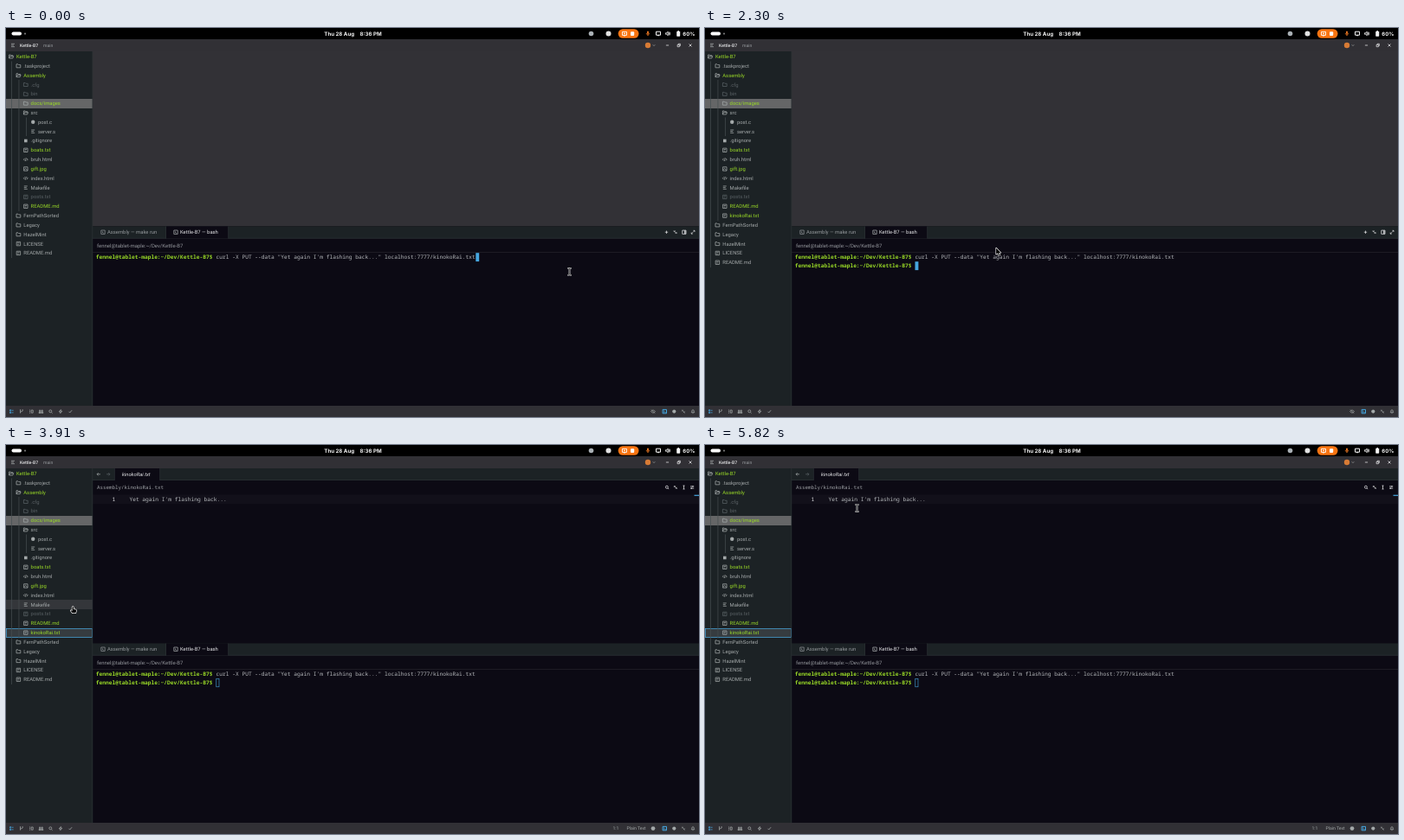
Write an HTML page with a canvas that moves like this. It is 800 by 450 pixels and loops after 5850 ms.

```html
<!DOCTYPE html>
<html lang="en">
<head>
<meta charset="utf-8">
<title>Editor and terminal</title>
<style>
html, body { margin: 0; width: 100%; height: 100%; overflow: hidden; background: #0c0a14; }
canvas { display: block; width: 800px; height: 450px; }
</style>
</head>
<body>
<canvas id="stage" width="800" height="450"></canvas>
<script>
const ctx = document.getElementById('stage').getContext('2d');
const LOOP = 5850;
const BELL = 300, ENTER = 1500, PRESS = 3235, OPEN = 3265;

const SANS = 'Roboto, "Noto Sans", sans-serif';
const MONO = '"Noto Sans Mono", "DejaVu Sans Mono", monospace';
const C = {
  bar: '#313035', side: '#1c2225', dark: '#0c0a14', edge: '#2c3236', guide: '#474e51',
  text: '#a3a8a9', dim: '#596064', green: '#98d827', blue: '#45a6df', white: '#e4e5e7'
};

const FILE = 'kinokoRai.txt', ROOT = 'Kettle-B7';
const PATH = 'fennel@tablet-maple:~/Dev/' + ROOT;
const MESSAGE = "Yet again I'm flashing back...";
const COMMAND = `curl -X PUT --data "${MESSAGE}" localhost:7777/${FILE}`;
const CHAR = 3.748;

// [indent, label, icon, colour]
const TREE = [
  [0, ROOT, 'open', C.green],
  [1, '.taskproject', 'folder', C.text],
  [1, 'Assembly', 'open', C.green],
  [2, '.cfg', 'folder', C.dim],
  [2, 'bin', 'folder', C.dim],
  [2, 'docs/images', 'folder', C.green],
  [2, 'src', 'open', C.text],
  [3, 'post.c', 'disc', C.text],
  [3, 'server.s', 'lines', C.text],
  [2, '.gitignore', 'square', C.text],
  [2, 'boats.txt', 'page', C.green],
  [2, 'bruh.html', 'code', C.text],
  [2, 'gift.jpg', 'image', C.green],
  [2, 'index.html', 'code', C.text],
  [2, 'Makefile', 'lines', C.text],
  [2, 'posts.txt', 'page', C.dim],
  [2, 'README.md', 'page', C.green],
  [2, FILE, 'page', C.green],
  [1, 'FernPathSorted', 'folder', C.text],
  [1, 'Legacy', 'folder', C.text],
  [1, 'HazelMint', 'folder', C.text],
  [1, 'LICENSE', 'page', C.text],
  [1, 'README.md', 'page', C.text]
];
const NEW_ROW = 17, MARKED_ROW = 5, ROW = 10.83;

// Line icons, each centred on the origin
const ICONS = {
  folder: 'M-2.4 2V-2H-.6L.1-1.2H2.4V2Z',
  open: 'M-2.4 2V-2H-.6L.1-1.2H2V-.3M-2.4 2L-1.4-.3H2.7L1.8 2Z',
  page: 'M-2.2-2.2H2.2V2.2H-2.2ZM-1.1-.8H1M-1.1.8H.4',
  image: 'M-2.2-2.2H2.2V2.2H-2.2ZM-2.1 1.6L0-.4L2.1 1.8M-.9-1.1H-.4',
  code: 'M-1.1-1.4L-2.4 0L-1.1 1.4M1.1-1.4L2.4 0L1.1 1.4M.4-1.8L-.4 1.8',
  lines: 'M-2-1.7H2M-2 0H1M-2 1.7H2',
  prompt: 'M-2.2-2.2H2.2V2.2H-2.2ZM-1.1-.8L-.1 0L-1.1.9M.3 1H1.2',
  plus: 'M-1.7 0H1.7M0-1.7V1.7',
  close: 'M-1.5-1.5L1.5 1.5M-1.5 1.5L1.5-1.5',
  minus: 'M-1.6 0H1.6',
  restore: 'M-1.6-.6H.7V1.7H-1.6ZM-.6-.7V-1.7H1.7V.6H.8',
  chevron: 'M-1.2-.6L0 .6L1.2-.6',
  pen: 'M-1.8-1.8L1.8 1.8M-1.8-.3L-.3-1.8M.1 1.5L1.6 0',
  split: 'M-2.1-2.1H2.1V2.1H-2.1ZM.6-2.1V2.1M1.3-1.8V1.8',
  expand: 'M.4-1.9H1.9V-.4M1.9-1.9L.3-.3M-.4 1.9H-1.9V.4M-1.9 1.9L-.3.3',
  back: 'M1.9 0H-1.9M-.4-1.6L-1.9 0L-.4 1.6',
  next: 'M-1.9 0H1.9M.4-1.6L1.9 0L.4 1.6',
  search: 'M1.1-.3A1.5 1.5 0 1 1-1.9-.3A1.5 1.5 0 1 1 1.1-.3M.7.9L1.9 2.1',
  beam: 'M-1-2H1M0-2V2M-1 2H1',
  sliders: 'M-2.1-1.1H2.1M-2.1 1.1H2.1M.8-2V-.2M-.8.2V2',
  panel: 'M-2-1.9H-.6V-.6H-2ZM-2 .6H-.6V1.9H-2ZM.4-1.3H2.1M.4 1.3H2.1',
  branch: 'M-1.3-2V2M1.3-2V-.9C1.3.5-1.3-.2-1.3 1M-1.8-1.7H-.8M.8-1.7H1.8',
  outline: 'M-2.1-1.6H-1M-2.1 0H-1M-2.1 1.6H-1M.1-1.6H2.1V1.6H.1Z',
  people: 'M-1.9-1.5H-.5V0H-1.9ZM.6-1.5H1.9V0H.6ZM-2.4 1.9V.9H0V1.9ZM.3.9H2.4V1.9H.6',
  bolt: 'M.3-2.1L-1.8.4H0L-.3 2.1L1.8-.4H0Z',
  check: 'M-1.8.2L-.6 1.4L1.8-1.4',
  hidden: 'M-2.4 0C-1-2 1-2 2.4 0C1 2-1 2-2.4 0M-2-2L2 2',
  bell: 'M-1.8 1.1H1.8L1.2.3V-.6C1.2-2.4-1.2-2.4-1.2-.6V.3ZM-.5 2H.5',
  mic: 'M-.5-2.4H.5V.2H-.5ZM-1.7-.3C-1.7 2 1.7 2 1.7-.3M0 1.5V2.6',
  screen: 'M-2.5-2H2.5V2H-2.5ZM-1 2.5H1',
  sound: 'M-2.4-.8H-1.3L.2-2.2V2.2L-1.3.8H-2.4ZM1.1-1.2Q2 0 1.1 1.2M1.9-2Q3.2 0 1.9 2'
};
for (const key in ICONS) ICONS[key] = new Path2D(ICONS[key]);

const ARROW = new Path2D('M0 0V7.3L1.7 5.8L2.9 8.4L4 7.9L2.9 5.4H5.2Z');
const HAND = new Path2D('M-.7.6Q0-.4.7.6V3L3.4 3.6Q4 3.9 3.8 4.8L3.2 7.3H-.6L-2.6 4.7Q-2.4 3.7-.7 5Z');
const BEAM = new Path2D('M-2.2-4Q0-4 0-3Q0-4 2.2-4M0-3.4V3.4M-2.2 4Q0 4 0 3Q0 4 2.2 4');

const linear = u => u, easeIn = u => u * u, easeOut = u => 1 - (1 - u) ** 2;
// [time, x, y, easing towards this point]
const MOUSE = [
  [0, 650.5, 281.8],
  [1080, 650.5, 281.8, linear],
  [1210, 609, 277, easeOut],
  [1820, 604, 275, linear],
  [2050, 604, 275, linear],
  [2300, 337.5, 254.5, easeIn],
  [2420, 176, 252, linear],
  [2760, 51.5, 219.5, easeOut],
  [3780, 51.5, 219.5, linear],
  [4120, 118.3, 135, linear],
  [4360, 161, 87, easeOut],
  [4760, 175.5, 73, easeOut]
];

function mouseAt(t) {
  const i = MOUSE.findIndex(k => k[0] > t);
  if (i < 0) return MOUSE[MOUSE.length - 1].slice(1, 3);
  const [t0, x0, y0] = MOUSE[i - 1], [t1, x1, y1, ease] = MOUSE[i];
  const u = ease((t - t0) / (t1 - t0));
  return [x0 + (x1 - x0) * u, y0 + (y1 - y0) * u];
}

function rect(x, y, w, h, color) {
  ctx.fillStyle = color;
  ctx.fillRect(x, y, w, h);
}

function frame(x, y, w, h, color, width = 0.8) {
  ctx.strokeStyle = color;
  ctx.lineWidth = width;
  ctx.strokeRect(x, y, w, h);
}

function pill(x, y, w, h, r, color) {
  ctx.fillStyle = color;
  ctx.beginPath();
  ctx.roundRect(x, y, w, h, r);
  ctx.fill();
}

const disc = (x, y, r, color) => pill(x - r, y - r, 2 * r, 2 * r, r, color);

function text(str, x, y, color, size = 5.85, family = SANS, style = '') {
  ctx.font = `${style} ${size}px ${family}`;
  ctx.fillStyle = color;
  ctx.fillText(str, x, y + size * 0.345);
}

function icon(name, x, y, color = C.text, width = 0.75) {
  if (name === 'disc') return disc(x, y, 2.2, color);
  if (name === 'square') return rect(x - 1.8, y - 1.8, 3.6, 3.6, color);
  ctx.save();
  ctx.translate(x, y);
  ctx.strokeStyle = color;
  ctx.lineWidth = width;
  ctx.stroke(ICONS[name]);
  ctx.restore();
}

function topBar() {
  rect(0, 0, 800, 13, '#000');
  pill(6.5, 4.6, 11.5, 4, 2, '#fff');
  disc(22, 6.6, 1.1, '#777');
  text('Thu 28 Aug', 367.3, 6.5, '#f4f4f4', 6.15, 'Inter, sans-serif', 'bold');
  text('8:36 PM', 408.5, 6.5, '#f4f4f4', 6.15, 'Inter, sans-serif', 'bold');
  disc(675.5, 6.5, 2.8, '#a9b0b5');
  disc(695.5, 6.5, 3, '#e2e2e2');
  pill(706.7, 1.3, 23.8, 10.4, 5.2, '#f97512');
  icon('screen', 714, 6.4, '#fff', 0.9);
  disc(714, 6.4, 0.8, '#fff');
  pill(721, 4.2, 4.2, 4.8, 1, '#fff');
  icon('mic', 741, 6.4, '#f07a24', 0.9);
  icon('screen', 753, 6.2, '#f4f4f4', 1);
  icon('sound', 764, 6.5, '#f4f4f4', 0.9);
  pill(774.2, 3.9, 4, 5.8, 0.7, '#f4f4f4');
  rect(775.3, 3.1, 1.8, 1, '#f4f4f4');
  text('60%', 781.3, 6.5, '#f4f4f4', 6, 'Inter, sans-serif', 'bold');
}

function titleBar() {
  rect(0, 13, 800, 14, C.bar);
  icon('lines', 8, 20, C.text);
  text(ROOT, 16, 20, C.white, 5.1, SANS, '500');
  text('main', 43, 20, '#989ca0', 5.1);
  disc(741, 20, 3.2, '#d77b35');
  icon('chevron', 748, 20);
  icon('minus', 763.5, 20, C.white);
  icon('restore', 776.7, 20, C.white);
  icon('close', 790, 20, C.white);
}

function guide(x, from, to) {
  rect(x, from, 0.7, to - from, C.guide);
}

function sidebar(t, mx, my) {
  rect(0, 27, 100, 410, C.side);
  const rows = TREE.filter((_, i) => t >= ENTER || i !== NEW_ROW);
  const hover = mx < 100 ? Math.floor((my - 27.6) / ROW) : -1;
  const top = i => Math.round(27.6 + i * ROW);
  const band = (i, color) => rect(0, top(i), 100, top(i + 1) - top(i), color);

  if (rows[hover] && hover !== MARKED_ROW) band(hover, '#34363a');
  band(MARKED_ROW, '#656667');
  if (t >= OPEN) {
    band(NEW_ROW, hover === NEW_ROW ? '#3b4043' : '#363c40');
    frame(0.5, top(NEW_ROW) + 0.5, 99, 10, C.blue, 0.7);
  }

  guide(6.2, 38.5, top(rows.length));
  guide(14.6, 60, top(rows.length - 5));
  guide(23, 103.5, 125);
  rows.forEach(([depth, label, kind, color], i) => {
    const y = 33 + i * ROW;
    icon(kind, 6 + depth * 8.4, y, color === C.dim ? C.dim : C.text);
    text(label, 12 + depth * 8.3, y, color);
  });
  rect(99.5, 27, 0.7, 410, C.edge);
}

function tabStrip(y, x, width) {
  rect(100, y, 700, 14, C.side);
  rect(100, y + 13.3, 700, 0.7, C.edge);
  rect(x, y, width, 14, C.dark);
  rect(x - 0.6, y, 0.6, 14, C.edge);
  rect(x + width, y, 0.6, 14, C.edge);
}

function editor(open) {
  if (!open) return rect(100, 27, 700, 202.5, '#323136');
  rect(100, 27, 700, 202.5, C.dark);
  tabStrip(27, 125.5, 52);
  icon('back', 107, 33.8, C.text);
  icon('next', 118, 33.8, C.dim);
  text(FILE, 134, 33.8, C.white, 5.85, SANS, 'italic');
  text('Assembly/' + FILE, 105, 49, '#a0a3a7', 5.83, MONO);
  ['search', 'pen', 'beam', 'sliders'].forEach((name, i) => icon(name, 763.3 + i * 9.6, 49, C.white));
  rect(100, 57.5, 700, 10.5, '#12101a');
  text('1', 122.4, 63, C.white, 6.247, MONO);
  text(MESSAGE, 142.4, 63, '#b7babd', 6.247, MONO);
  rect(794.5, 57.7, 5.5, 1.2, C.blue);
}

function terminal(t) {
  const focused = t < PRESS;
  rect(100, 229.5, 700, 207.5, C.dark);
  tabStrip(229.5, 185, 71.5);
  icon('prompt', 112, 236.2, '#8c9194');
  text('Assembly — make run', 117, 236.2, '#94999c', 5.87);
  if (t >= BELL && t < ENTER) disc(188.6, 236.2, 1.3, C.blue);
  icon('prompt', 196, 236.2, C.text);
  text(ROOT + ' — bash', 201, 236.2, C.white, 5.87);
  if (focused) {
    ['plus', 'pen', 'split', 'expand'].forEach((name, i) => icon(name, 762.5 + i * 10.2, 236.2, C.white));
  }
  text(PATH, 105, 251.5, '#92959a', 5.98);
  rect(100, 259.3, 700, 0.7, '#24232b');

  const prompt = y => text(PATH + '$', 103.8, y, C.green, 6.247, MONO, 'bold');
  const start = 103.8 + (PATH.length + 2) * CHAR;
  prompt(265);
  text(COMMAND, start, 265, '#b7babd', 6.247, MONO);
  let x = start + COMMAND.length * CHAR, y = 260.2;
  if (t >= ENTER) {
    prompt(275.2);
    x = start;
    y = 270.2;
  }
  if (focused) rect(x, y, 3.9, 9.9, C.blue);
  else frame(x + 0.3, y + 0.4, 3.2, 9.2, C.blue, 0.6);
}

function statusBar(open) {
  rect(0, 437, 800, 13, C.bar);
  const left = ['panel', 'branch', 'outline', 'people', 'search', 'bolt', 'check'];
  left.forEach((name, i) => icon(name, 6.5 + i * 11.3, 443.6, i ? C.text : C.blue));
  if (open) {
    text('1:1', 700.5, 443.6, C.text, 5.1);
    text('Plain Text', 716.5, 443.6, C.text, 5.1);
    disc(747, 443.6, 2.4, C.text);
  } else {
    icon('hidden', 747, 443.6);
  }
  icon('prompt', 760.3, 443.6, C.blue, 1);
  disc(771.3, 443.6, 2.1, C.text);
  icon('pen', 782, 443.6);
  icon('bell', 793, 443.6);
}

function pointer(x, y, open) {
  const overText = y > 261 || (open && x > 134 && y > 57 && y < 229);
  const shape = x < 100 ? HAND : overText ? BEAM : ARROW;
  ctx.save();
  ctx.translate(x, y);
  ctx.lineJoin = 'round';
  ctx.strokeStyle = '#f2f2f2';
  ctx.lineWidth = shape === BEAM ? 1.7 : 1.4;
  ctx.stroke(shape);
  if (shape === BEAM) {
    ctx.strokeStyle = '#000';
    ctx.lineWidth = 0.6;
    ctx.stroke(shape);
  } else {
    ctx.fillStyle = '#000';
    ctx.fill(shape);
  }
  ctx.restore();
}

function draw() {
  const t = performance.now() % LOOP;
  const [x, y] = mouseAt(t), open = t >= OPEN;
  ctx.textRendering = 'geometricPrecision';
  topBar();
  titleBar();
  editor(open);
  terminal(t);
  sidebar(t, x, y);
  statusBar(open);
  pointer(x, y, open);
  requestAnimationFrame(draw);
}
draw();
</script>
</body>
</html>
```
